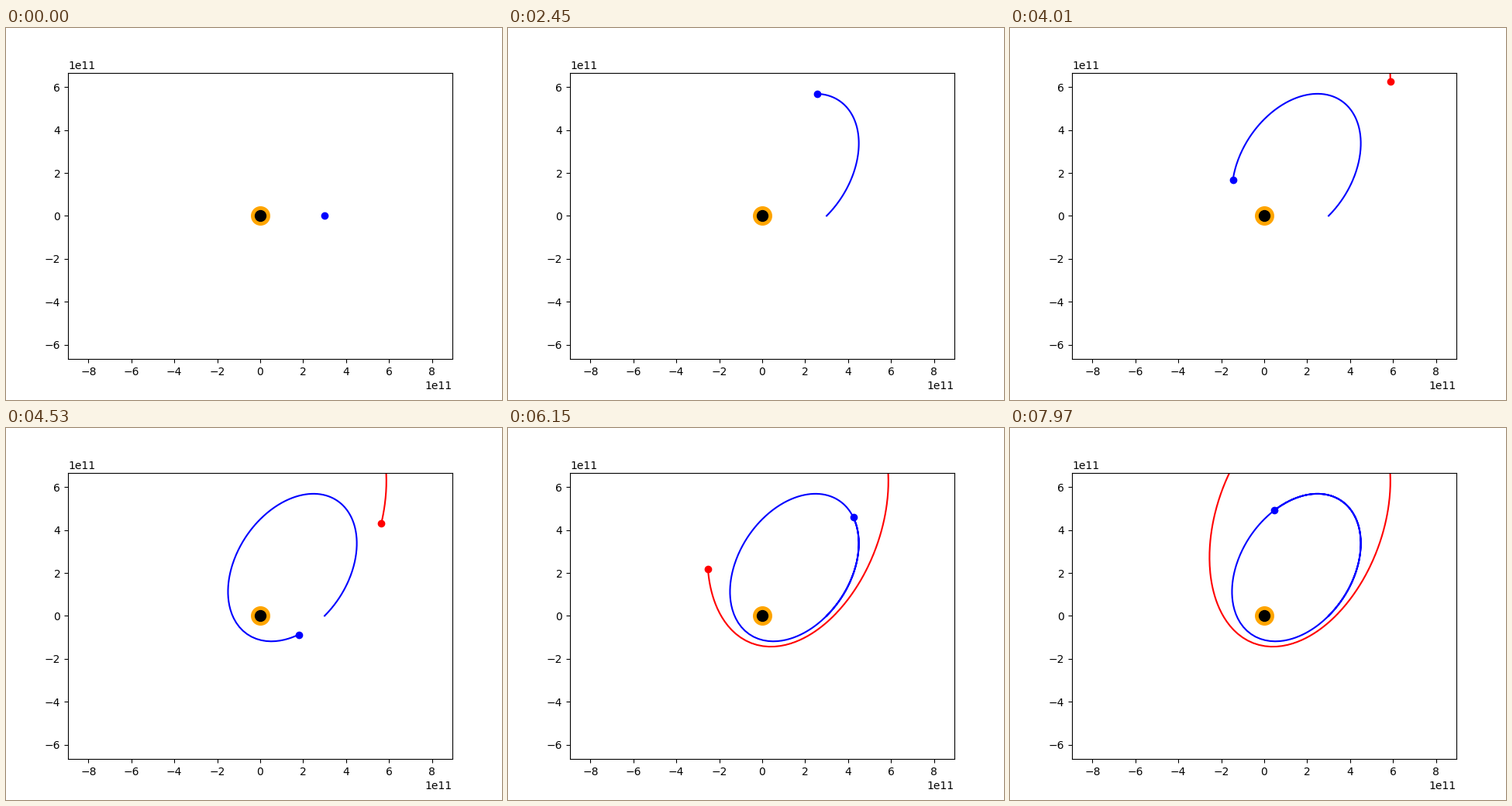
Recreate the animation shown at these times as a matplotlib script. Size 640 px wide and 480 px high, loop 7.99 s.

```python
import numpy as np
import matplotlib.pyplot as plt
from matplotlib.animation import FuncAnimation

INTERVAL = 17
FRAMES = 470
STEP_MS = 20
LAST_STEP = 397
HOLD_AT, HOLD_MS = 2000, 30   # short pause in the motion
UNIT = 1e11
PX_PER_UNIT = 27.7


def orbit(a, ecc_vec, phase, rate, spin):
    """Kepler ellipse around the origin, one point per step.

    ecc_vec points to the far end, phase is the mean anomaly from there.
    """
    e = np.hypot(*ecc_vec)
    b = a * np.sqrt(1 - e * e)
    ux, uy = np.array(ecc_vec) / e
    wx, wy = -spin * uy, spin * ux
    mean = np.pi + phase + rate * np.arange(LAST_STEP + 1)
    ecc = mean + e * np.sin(mean)
    for _ in range(15):
        ecc -= (ecc - e * np.sin(ecc) - mean) / (1 - e * np.cos(ecc))
    along = a * (e - np.cos(ecc))
    across = -b * np.sin(ecc)
    return UNIT * (along * ux + across * wx), UNIT * (along * uy + across * wy)


def step_at(ms):
    if ms >= HOLD_AT:
        ms = max(HOLD_AT - 1, ms - HOLD_MS)
    return min(ms // STEP_MS, LAST_STEP)


fig, ax = plt.subplots(figsize=(6.4, 4.8), dpi=100)
half_w, half_h = 248 / PX_PER_UNIT * UNIT, 184.8 / PX_PER_UNIT * UNIT
ax.set_xlim(-half_w, half_w)
ax.set_ylim(-half_h, half_h)

ax.plot(0, 0, "o", color="orange", markersize=17)
ax.plot(0, 0, "o", color="black", markersize=10)

bodies = []
for color, path in (
    ("blue", orbit(3.75, (0.4, 0.6), -2.5447, 0.026675, 1)),
    ("red", orbit(6.164, (0.27, 0.73), -1.516, 0.016236, -1)),
):
    trail, = ax.plot([], [], color=color, lw=1.5)
    dot, = ax.plot([], [], "o", color=color, markersize=6)
    bodies.append((path, trail, dot))


def update(frame):
    n = step_at(frame * INTERVAL + INTERVAL - 1)
    for (x, y), trail, dot in bodies:
        trail.set_data(x[:n + 1], y[:n + 1])
        dot.set_data([x[n]], [y[n]])
    return [artist for _, *pair in bodies for artist in pair]


anim = FuncAnimation(fig, update, frames=FRAMES, init_func=lambda: update(0),
                     interval=INTERVAL, repeat=True, repeat_delay=0)
plt.show()
```
